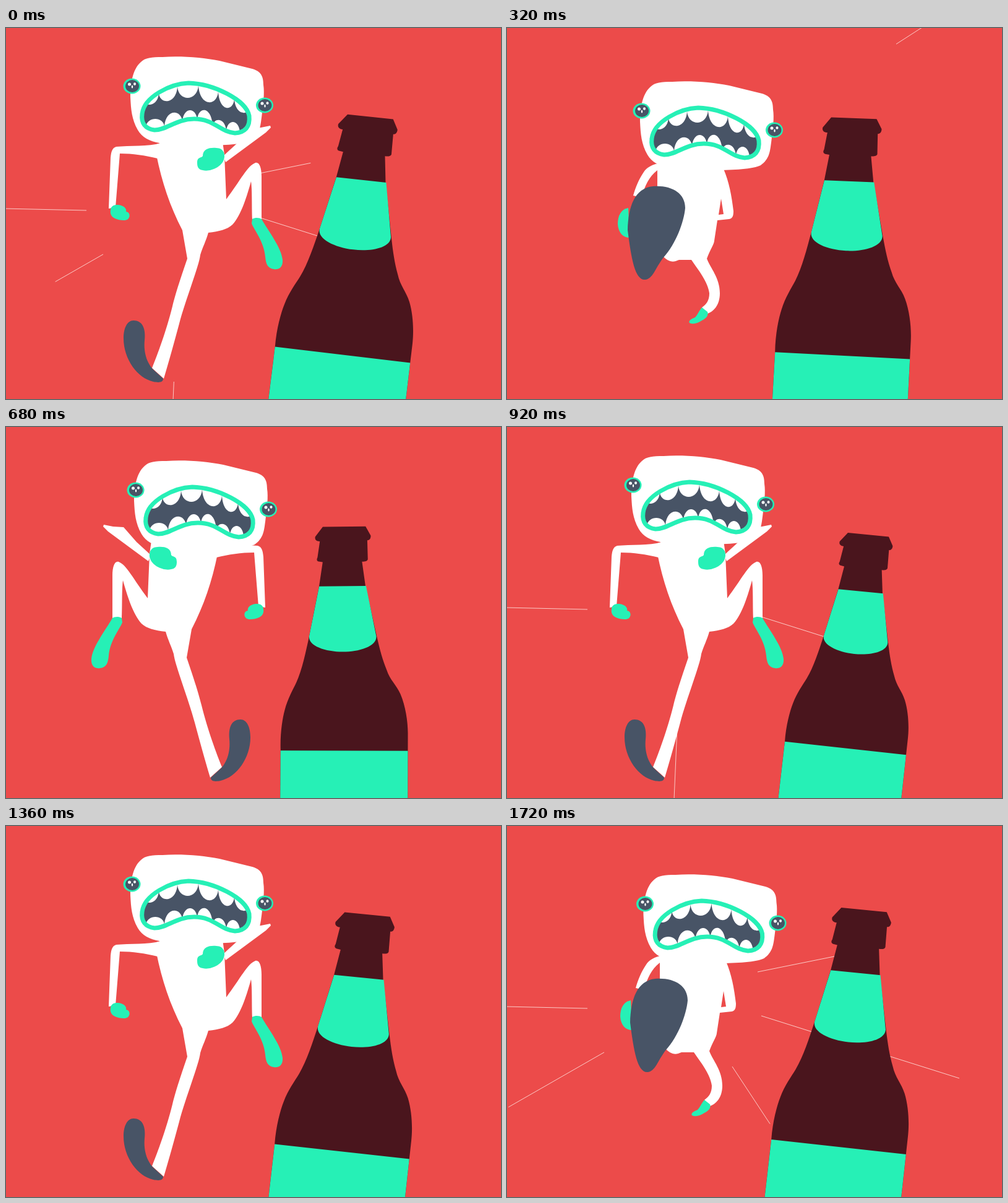
Write an HTML page with a canvas that moves like this. It is 800 px wide and 600 px high and loops after 1.76 s.

```html
<!DOCTYPE html>
<html lang="en">
<head>
<meta charset="utf-8">
<title>Runner and bottle</title>
<style>
  html, body { margin: 0; width: 100%; height: 100%; overflow: hidden; background: #ec4b4a; }
  canvas { display: block; width: 100%; height: 100%; }
</style>
</head>
<body>
<canvas id="stage" width="800" height="600"></canvas>
<script>
const ctx = document.getElementById('stage').getContext('2d');
const RED = '#ec4b4a', GREEN = '#26f0b6', SLATE = '#485466', BROWN = '#4a151d', WHITE = '#ffffff';
const STEP = 40, FRAMES = 44, CYCLE = 11;
const shape = d => new Path2D(d);

function fill(path, color) {
  ctx.fillStyle = color;
  ctx.fill(path);
}

function oval(x, y, rx, ry, color) {
  ctx.beginPath();
  ctx.ellipse(x, y, rx, ry, 0, 0, Math.PI * 2);
  ctx.fillStyle = color;
  ctx.fill();
}

// Speed lines: inner end, outer end, then the times of full length.
const LINES = [
  [130, 295, -270, 286, [21, 43]],
  [157, 366, -75, 499, [20, 42]],
  [405, 236, 667, 183, [20, 42]],
  [411, 307, 731, 408, [4, 21, 43]],
  [278, 418, 268, 649, [2, 24]],
  [364, 389, 547, 667, [19, 41]],
  [145, 219, -134, 36, [3, 13]],
  [177, 387, 6, 531, [4, 38]],
  [411, 259, 815, 250, [4, 38]],
  [384, 367, 584, 564, [3]],
  [137, 324, -150, 378, [12]],
  [140, 333, -140, 405, [12]],
  [320, 415, 356, 578, [11]],
  [397, 346, 674, 537, [12]],
  [427, 156, 730, -39, [10]]
];
const LINE_LIFE = 3;

function drawLines(n) {
  ctx.strokeStyle = 'rgba(255, 235, 230, 0.8)';
  ctx.lineWidth = 1;
  ctx.beginPath();
  for (const [px, py, qx, qy, times] of LINES) {
    for (const t of times) {
      const age = (n - t + FRAMES * 1.5) % FRAMES - FRAMES / 2;
      if (Math.abs(age) >= LINE_LIFE) continue;
      const near = Math.max(0, -age / LINE_LIFE);
      const far = Math.min(1, 1 - age / LINE_LIFE);
      ctx.moveTo(px + (qx - px) * near, py + (qy - py) * near);
      ctx.lineTo(px + (qx - px) * far, py + (qy - py) * far);
    }
  }
  ctx.stroke();
}

// Head
const skull = shape('M218 55C225 48 235 47 253 47C285 45 318 48 345 53L398 66C412 70 416 78 416 92C418 105 416 122 413 145C411 160 410 172 396 182C385 188 350 190 323 190C295 190 265 189 248 186C232 183 220 177 213 165C203 147 202 132 201 112C201 92 204 67 218 55Z');
const mouth = shape('M220 139C223 111 266 90 295 89C335 90 388 116 393 142C395 160 386 169 370 170C346 168 336 147 304 147C275 147 260 165 240 165C225 163 218 154 220 139Z');

// Row of teeth: gap points joined by rounded tips.
function teeth(gaps, tips, back) {
  const p = new Path2D();
  p.moveTo(gaps[0][0], back);
  p.lineTo(...gaps[0]);
  tips.forEach((tip, i) => {
    const [x0, y0] = gaps[i], [x1, y1] = gaps[i + 1];
    const c = (tip - (y0 + y1) / 8) / 0.75;
    p.bezierCurveTo(x0 + 2, c, x1 - 2, c, x1, y1);
  });
  p.lineTo(gaps[gaps.length - 1][0], back);
  p.closePath();
  return p;
}
const upperTeeth = teeth(
  [[226, 121], [247, 106], [277, 95], [311, 93], [343, 103], [369, 115], [390, 134]],
  [123, 118, 113, 120, 129, 136], 70);
const lowerTeeth = teeth(
  [[226, 160], [256, 159], [285, 151], [309, 148], [334, 158], [356, 166], [378, 168]],
  [147, 137, 133, 133, 149, 152], 190);

function drawEye(x, y) {
  oval(x, y, 14, 12.5, GREEN);
  oval(x + 0.5, y, 11, 10, SLATE);
  oval(x - 4, y - 3, 2.5, 2.5, WHITE);
  oval(x + 4.5, y - 3.5, 2, 2.2, WHITE);
  oval(x + 0.5, y + 1, 1.2, 2.5, WHITE);
}

function drawHead(dx, dy) {
  ctx.save();
  ctx.translate(dx, dy);
  fill(skull, WHITE);
  fill(mouth, SLATE);
  ctx.save();
  ctx.clip(mouth);
  fill(upperTeeth, WHITE);
  fill(lowerTeeth, WHITE);
  ctx.restore();
  ctx.strokeStyle = GREEN;
  ctx.lineWidth = 7;
  ctx.stroke(mouth);
  drawEye(203.5, 94);
  drawEye(418, 125);
  ctx.restore();
}

// Bodies: each is a list of [path, colour], back to front.
const stride = [
  [shape('M243 205C252 250 265 288 285 327L293 373C288 388 275 425 269 450C259 490 245 528 236 550L255 567C263 540 272 508 280 478C290 440 312 385 314 367C318 354 323 345 327 331C345 329 357 326 366 318C380 303 390 270 396 248C398 262 397 290 398 310L413 309L413 240C413 225 409 216 403 218C390 223 380 245 356 277L353 205L350 184L250 180Z'), WHITE],
  [shape('M250 186C230 192 200 190 178 192C172 194 170 199 169 210L166 292L177 290L184 203C205 203 225 206 245 211Z'), WHITE],
  [shape('M395 162L412 161L427 158L428 161L420 169L355 217L351 207L374 186Z'), WHITE],
  [shape('M309 218C309 208 315 211 318 207C318 195 330 193 340 194C352 194 355 205 352 213C348 225 330 233 318 230C311 229 309 225 309 218Z'), GREEN],
  [shape('M169 295C169 285 180 285 186 287C193 289 195 294 194 297C200 298 201 304 198 308C195 313 183 311 176 308C170 305 168 300 169 295Z'), GREEN],
  [shape('M398 309C403 306 410 307 413 309C425 330 445 355 447 375C448 388 440 391 433 390C422 389 420 380 419 370C417 345 400 325 397 316Z'), GREEN],
  [shape('M206 473C220 473 226 485 224 505C222 525 228 545 242 556L254 567C254 573 248 574 238 572C212 566 190 535 190 502C190 485 196 473 206 473Z'), SLATE]
];

const kickBody = [
  [shape('M231 219C235 212 245 208 260 206L338 206L338 270L334 330C336 345 334 354 327 362C318 370 312 370 303 366L283 366C272 382 256 402 254 420C254 432 259 438 266 443L257 453C248 450 237 440 237 420C237 395 252 380 258 364C253 350 246 340 246 335L241 302L222 300C216 299 215 294 215 287C218 262 222 240 231 219ZM235 267L231 292L239 293Z'), WHITE],
  [shape('M332 209C346 211 356 217 360 224C368 236 373 248 377 262L364 265C358 246 352 232 338 221Z'), WHITE],
  [shape('M257 450L266 443C270 447 273 455 277 459C285 462 288 465 286 468C280 471 272 468 266 464C258 460 255 455 257 450Z'), GREEN],
  [shape('M301 293C301 283 312 279 318 283C322 279 325 284 330 282C336 287 333 297 328 300C320 306 301 305 301 293Z'), GREEN]
];
const kickFoot = [
  [shape('M400 312C400 322 395 330 387 329L388 313Z'), GREEN],
  [shape('M334 320C336 290 345 262 370 257C395 254 421 258 422 272C423 285 410 299 400 310C385 325 385 345 378 370C372 390 365 399 357 398C345 396 334 365 334 320Z'), SLATE]
];
const otherFoot = [
  [shape('M200 282C188 284 183 295 183 308C184 322 191 330 202 330Z'), GREEN],
  [shape('M199 318C200 280 210 250 240 247C270 245 292 258 292 282C290 305 277 340 257 362C243 380 240 397 227 398C211 399 205 365 199 318Z'), SLATE]
];

const POSES = [
  { body: stride, head: [0, 0] },
  { body: kickBody, foot: kickFoot, head: [-6, 32], shift: [4, 9] },
  { body: kickBody, foot: kickFoot, head: [-12.5, 24] },
  { body: stride, head: [6, 8], flip: true },
  { body: kickBody, foot: otherFoot, head: [14, 40], shift: [-4, 9], flip: true },
  { body: kickBody, foot: otherFoot, head: [19.5, 32], flip: true }
];

function drawRunner(n) {
  const pose = POSES[Math.floor((n % CYCLE) * POSES.length / CYCLE)];
  const [sx, sy] = pose.shift || [0, 0];
  const parts = list => list.forEach(([path, color]) => fill(path, color));
  const limbs = front => {
    ctx.save();
    ctx.translate(sx, sy);
    if (pose.flip) ctx.transform(-1, 0, 0, 1, 585, 0);
    parts(pose.body.filter(([, color]) => (color !== WHITE) === front));
    ctx.restore();
  };
  limbs(false);
  drawHead(...pose.head);
  limbs(true);
  if (pose.foot) {
    ctx.save();
    ctx.translate(sx, sy);
    parts(pose.foot);
    ctx.restore();
  }
}

// Bottle, drawn around the middle of its lower label edge.
const PIVOT = [541, 530];
const glass = shape('M503 143L577 142L586 158C586 163 584 166 580 166L581 199C580 202 577 203 571 203L577 245L597 333C602 355 607 373 614 390C620 408 631 416 638 432C647 453 651 480 651 500L651 530L651 720L430 720L431 530C430 500 434 475 438 460C443 440 452 425 458 412C468 390 474 360 480 332L497 245L503 204L496 203C493 202 492 200 494 196L498 168C491 168 489 164 490 160Z');
const neckLabel = shape('M497 246L578 245L596 332C597 350 565 359 538 359C508 359 478 349 480 332Z');
const baseLabel = shape('M431 530L651 530L651 720L430 720Z');

// time, x, y, scale
const BOTTLE = [
  [0, 544, 528.5, 1], [5, 541, 530, 1], [12, 544.5, 528.5, 0.974], [23, 547, 519.5, 0.896],
  [27, 538, 532.5, 0.936], [34, 543, 526.5, 0.995], [43, 536, 519, 0.995]
];

function track(n, col) {
  const last = BOTTLE.length - 1;
  let i = 0;
  while (i < last - 1 && n >= BOTTLE[i + 1][0]) i++;
  const a = BOTTLE[i], b = BOTTLE[i + 1];
  const slope = k => {
    const p = BOTTLE[Math.max(0, k - 1)], q = BOTTLE[Math.min(last, k + 1)];
    return (q[col] - p[col]) / (q[0] - p[0]);
  };
  const w = b[0] - a[0], u = (n - a[0]) / w, v = 1 - u;
  return v * v * (1 + 2 * u) * a[col] + u * u * (1 + 2 * v) * b[col]
    + w * u * v * (v * slope(i) - u * slope(i + 1));
}

function drawBottle(n) {
  const tilt = 3.4 * (1 + Math.cos(2 * Math.PI * n / CYCLE));
  const scale = track(n, 3);
  ctx.save();
  ctx.translate(track(n, 1), track(n, 2));
  ctx.rotate(tilt * Math.PI / 180);
  ctx.scale(scale, scale);
  ctx.translate(-PIVOT[0], -PIVOT[1]);
  fill(glass, BROWN);
  fill(neckLabel, GREEN);
  fill(baseLabel, GREEN);
  ctx.restore();
}

function draw(ms) {
  const n = Math.floor(ms / STEP) % FRAMES;
  ctx.fillStyle = RED;
  ctx.fillRect(0, 0, 800, 600);
  drawLines(n);
  drawRunner(n);
  drawBottle(n);
}

const start = performance.now();
function tick() {
  draw(performance.now() - start);
  requestAnimationFrame(tick);
}
tick();
</script>
</body>
</html>
```
